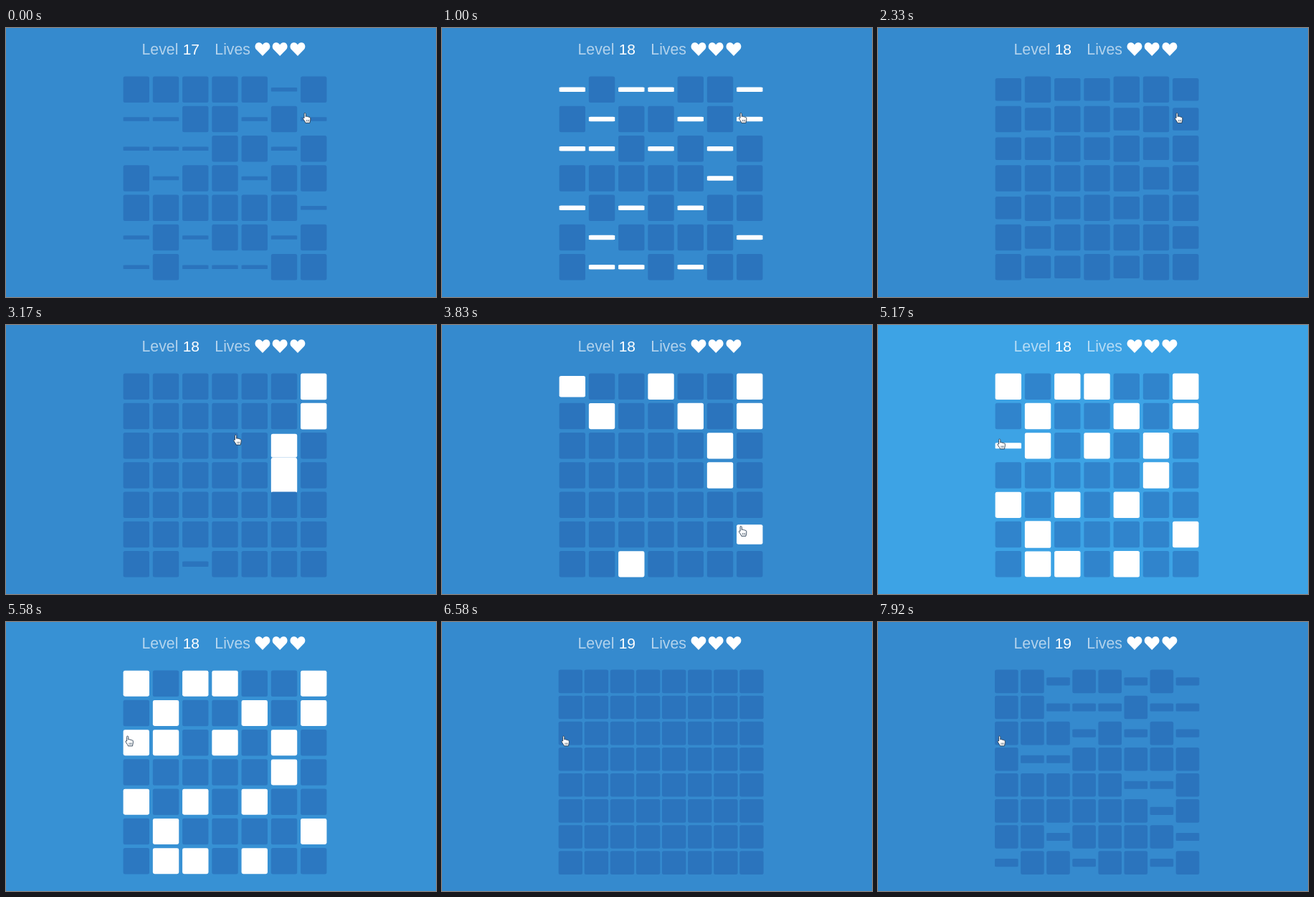
Animation of 600x375 px, one loop 8 s. Source, as an HTML page:

```html
<!DOCTYPE html>
<html lang="en">
<head>
<meta charset="utf-8">
<title>Memory tiles</title>
<style>
html, body { margin: 0; width: 100%; height: 100%; overflow: hidden; background: #358ace; }
svg { display: block; width: 100vw; height: 100vh; }
text { font: 21px "Liberation Sans", Arial, sans-serif; fill: #fff; }
.label { font-size: 21.3px; fill-opacity: .62; }
</style>
</head>
<body>
<svg id="stage" viewBox="0 0 600 375">
  <rect id="back" width="600" height="375"/>
  <text class="label" x="189.5" y="37">Level</text>
  <text id="level" x="246.7" y="37"></text>
  <text class="label" x="291.3" y="37">Lives</text>
  <g id="hearts" fill="#fff"></g>
  <g id="tiles"></g>
  <g id="hand">
    <path d="M-3.3 -6.6c1.2 -.5 2 .2 2 1.3V-1.8c1 -.7 2 -.4 2.3 .3c.9 -.5 1.8 -.2 2.1 .6c1.1 -.4 2.1 .2 2.1 1.4V3c0 1.2 -.8 2.2 -.8 4H-1.8C-2 5.5 -3.3 4.2 -5 1.4c-.7 -1.2 .7 -2.1 1.5 -1.2V-5.4c0 -.6 .1 -1 .2 -1.2z"
      fill="#fff" stroke="#23384e" stroke-width=".9" stroke-linejoin="round"/>
    <path d="M-.2 2.6v2.6M1.5 2.6v2.6M3.1 2.6v2.6" stroke="#23384e" stroke-width=".6"/>
  </g>
</svg>
<script>
const LOOP = 8000;
const NS = "http://www.w3.org/2000/svg";
const $ = id => document.getElementById(id);
const clamp = v => Math.max(0, Math.min(1, v));
const ease = v => v * v * (3 - 2 * v);

const BASE = [53, 138, 206], LIGHT = [61, 163, 229], SHADE = [24, 75, 157];
const mix = (a, b, k) => a.map((v, i) => v + (b[i] - v) * k);
const rgb = c => `rgb(${c.map(Math.round)})`;

// Each row lists the columns of its lit tiles.
const PATTERNS = {
  17: ["5", "0146", "0125", "14", "6", "025", "0234"],
  18: ["0236", "146", "0135", "5", "024", "16", "124"],
  19: ["257", "23467", "357", "12", "56", "6", "27", "036"]
};
const GRIDS = {
  7: { x: 163.6, y: 67.6, pitch: 41.25, size: 36.4 },
  8: { x: 163, y: 66.6, pitch: 36.1, size: 32.6 }
};

// Clicked tiles as row and column, with click times.
const order = "16 06 25 35 62 14 03 11 00 56 64 02 23 44 42 61 51 40 21 20".split(" ");
const times = [2540, 2670, 2800, 2930, 3060, 3200, 3335, 3485, 3650, 3654,
  3950, 4060, 4165, 4270, 4370, 4470, 4570, 4680, 4825, 5030];
const clickAt = {};
order.forEach((key, i) => clickAt[key] = times[i]);

const SLOW = 300, QUICK = 120, SETTLE = 1000;
const GRID_SWAP = 6504;

const elastic = t => t <= 0 ? 0 : t >= 1 ? 1
  : 1 + 2 ** (-10 * t) * Math.sin((t - .075) * 2 * Math.PI / .3);

// A flip is its start, folding time and whether it ends white.
function flips(level, key) {
  const lit = PATTERNS[level][key[0]].includes(key[1]);
  if (!lit) return [];
  if (level === 17) return [[-315, SLOW, 0]];
  if (level === 19) return [[7660, SLOW, 1]];
  return [[683, SLOW, 1], [1740, SLOW, 0], [clickAt[key], QUICK, 1], [5518, SLOW, 0]];
}

// Height factor and colour of a tile: shrink, swap colour, spring open.
function tileState(level, key, t) {
  let white = 0, scale = 1;
  for (const [start, fold, to] of flips(level, key)) {
    if (t < start) break;
    const u = t - start;
    if (u < fold) return { white, scale: 1 - (u / fold) ** 3 };
    white = to;
    scale = elastic((u - fold) / SETTLE);
  }
  return { white, scale };
}

function handSpot(key) {
  const g = GRIDS[7], [r, c] = [+key[0], +key[1]];
  return [g.x + c * g.pitch + 8.5, g.y + r * g.pitch + 17.2 - .75 * r];
}

function handAt(t) {
  let spot = handSpot(order[0]);
  for (let i = 1; i < order.length; i++) {
    const start = Math.max(times[i] - 110, times[i - 1]);
    if (t < start) break;
    spot = mix(spot, handSpot(order[i]), ease(clamp((t - start) / (times[i] - start))));
  }
  return spot;
}

function add(parent, name, attrs) {
  const el = document.createElementNS(NS, name);
  for (const k in attrs) el.setAttribute(k, attrs[k]);
  return parent.appendChild(el);
}

for (const x of [358, 382.2, 407])
  add($("hearts"), "path", {
    transform: `translate(${x} 29.5)`,
    d: "M0 9.5L-8.8 .6C-12 -2.8 -10.4 -9.2 -5.2 -9.2C-2.6 -9.2 -1 -7.6 0 -6C1 -7.6 2.6 -9.2 5.2 -9.2C10.4 -9.2 12 -2.8 8.8 .6Z"
  });
const rects = Array.from({ length: 64 }, () => add($("tiles"), "rect", { rx: 2.5 }));

function draw(t) {
  const glow = clamp((t - 5040) / 70) * (1 - ease(clamp((t - 5200) / 580)));
  const back = mix(BASE, LIGHT, glow);
  const dark = rgb(mix(back, SHADE, .35));
  $("back").setAttribute("fill", rgb(back));
  $("level").textContent = t < 420 ? 17 : t < 6250 ? 18 : 19;

  const level = t < 600 ? 17 : t < GRID_SWAP - 10 ? 18 : 19;
  const n = level === 19 ? 8 : 7, g = GRIDS[n], half = g.size / 2;
  const wide = level === 19 ? elastic((t - GRID_SWAP) / SETTLE) : 1;
  rects.forEach((el, i) => {
    const r = Math.floor(i / n), c = i % n;
    el.setAttribute("display", r < n ? "inline" : "none");
    if (r >= n) return;
    const { white, scale } = tileState(level, `${r}${c}`, t);
    const cx = g.x + c * g.pitch + half, cy = g.y + r * g.pitch + half;
    el.setAttribute("x", -half);
    el.setAttribute("y", -half);
    el.setAttribute("width", g.size);
    el.setAttribute("height", g.size);
    el.setAttribute("fill", white ? "#fff" : dark);
    el.setAttribute("transform", `translate(${cx} ${cy}) scale(${wide} ${scale})`);
  });

  $("hand").setAttribute("transform", `translate(${handAt(t)})`);
}

const begin = performance.now();
function tick() {
  draw((performance.now() - begin) % LOOP);
  requestAnimationFrame(tick);
}
tick();
</script>
</body>
</html>
```
